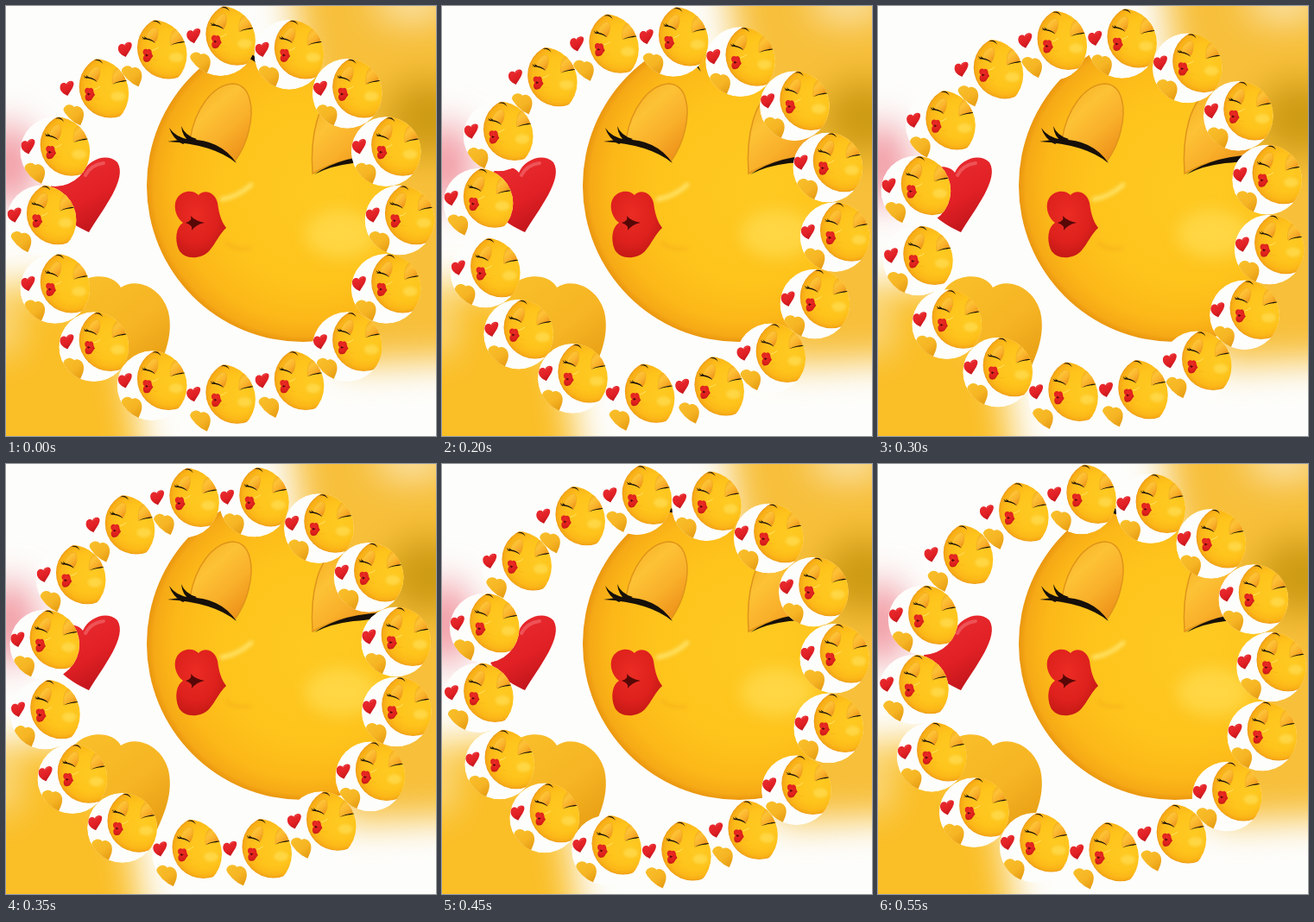
These frames come from a looping animation (498 by 498 pixels, 0.6 s). An HTML page:

```html
<!DOCTYPE html>
<html lang="en">
<head>
<meta charset="utf-8">
<title>Kiss ring</title>
<style>
  html, body { margin: 0; width: 100%; height: 100%; overflow: hidden; background: #fdfdfb; }
  svg { display: block; width: 498px; height: 498px; }
</style>
</head>
<body>
<svg viewBox="0 0 498 498">
  <defs>
    <filter id="soft" filterUnits="userSpaceOnUse" x="-120" y="-120" width="740" height="740" color-interpolation-filters="sRGB">
      <feGaussianBlur stdDeviation="21"/>
    </filter>
    <filter id="glow" x="-50%" y="-50%" width="200%" height="200%" color-interpolation-filters="sRGB">
      <feGaussianBlur stdDeviation="9"/>
    </filter>
    <filter id="sheen" x="-50%" y="-50%" width="200%" height="200%" color-interpolation-filters="sRGB">
      <feGaussianBlur stdDeviation="2"/>
    </filter>
    <clipPath id="disc"><circle cx="248.5" cy="248" r="202"/></clipPath>
    <radialGradient id="skin" gradientUnits="userSpaceOnUse" cx="344" cy="208" r="181" fx="375" fy="220">
      <stop offset="0" stop-color="#feca22"/>
      <stop offset=".6" stop-color="#fec41c"/>
      <stop offset=".85" stop-color="#fcb818"/>
      <stop offset=".96" stop-color="#f6aa16"/>
      <stop offset="1" stop-color="#ea960f"/>
    </radialGradient>
    <linearGradient id="lid" x1=".1" y1="0" x2=".8" y2="1">
      <stop offset="0" stop-color="#f5ac1e"/>
      <stop offset=".35" stop-color="#fdc236"/>
      <stop offset=".65" stop-color="#f9b02a"/>
      <stop offset="1" stop-color="#ec8f18"/>
    </linearGradient>
    <linearGradient id="hand" x1="0" y1="0" x2=".7" y2="1">
      <stop offset="0" stop-color="#f9c02a"/>
      <stop offset=".6" stop-color="#f6b524"/>
      <stop offset="1" stop-color="#e79d13"/>
    </linearGradient>
    <linearGradient id="heart" x1=".3" y1="0" x2=".8" y2="1">
      <stop offset="0" stop-color="#ea2c30"/>
      <stop offset=".55" stop-color="#e02024"/>
      <stop offset="1" stop-color="#b9131a"/>
    </linearGradient>
    <radialGradient id="lips" cx=".4" cy=".35" r=".7">
      <stop offset="0" stop-color="#ea2c24"/>
      <stop offset=".6" stop-color="#df211d"/>
      <stop offset="1" stop-color="#c01814"/>
    </radialGradient>

    <g id="scene" clip-path="url(#disc)">
      <circle cx="248.5" cy="248" r="203" fill="#fdfdfb"/>
      <path fill="url(#heart)" d="M96 262C80 254 52 241 52 212C52 186 79 180 89 193C95 178 117 169 129 181C141 200 113 234 96 262Z"/>
      <path d="M92 196Q98 184 113 182" fill="none" stroke="#f47075" stroke-width="4" stroke-linecap="round" opacity=".6"/>
      <path fill="url(#hand)" d="M133 326C125 311 100 309 84 321C60 340 70 380 110 405L168 440C176 418 196 388 188 354C180 325 150 314 133 326Z"/>
      <circle cx="344" cy="208" r="181" fill="url(#skin)"/>
      <ellipse cx="388" cy="264" rx="42" ry="28" fill="#ffe05c" opacity=".6" filter="url(#glow)"/>
      <path d="M250 224Q270 220 284 207" fill="none" stroke="#ffe368" stroke-width="5" stroke-linecap="round" filter="url(#sheen)"/>
      <path d="M254 274Q266 283 284 281" fill="none" stroke="#f0a51a" stroke-width="3" opacity=".5" filter="url(#sheen)"/>

      <path fill="url(#lid)" stroke="#e0941a" stroke-width="1.5" d="M213 155C219 118 240 91 263 90C283 91 288 118 281 145Q277 163 265 180Q244 156 213 155Z"/>
      <path fill="url(#lid)" stroke="#e0941a" stroke-width="1.5" d="M355 194C352 152 361 104 388 98C414 98 428 140 430 174Q390 174 355 194Z"/>
      <g fill="#17100a">
        <path d="M187 157Q243 146 267 182Q240 160 187 157Z"/>
        <path d="M189 141Q196 152 213 155L205 160Q193 154 189 141ZM203 139Q207 150 221 154L214 158Q204 152 203 139Z"/>
        <path d="M357 195Q390 172 446 172Q432 180 402 182Q376 185 357 195Z"/>
        <path d="M250 58Q282 38 300 76Q278 50 250 58ZM372 80Q402 56 424 86Q400 66 372 80Z"/>
      </g>

      <path fill="url(#lips)" d="M205 251C194 243 191 222 206 216C214 213 220 216 223 219C229 212 242 215 245 228C247 243 250 250 255 257C247 264 243 275 235 284C225 294 206 294 200 282C195 270 197 256 205 251Z"/>
      <path fill="#570806" d="M214 243Q219 249 230 251Q220 253 215 260Q217 254 208 251Q216 249 214 243Z"/>
    </g>
  </defs>

  <rect width="498" height="498" fill="#fdfdfb"/>
  <g filter="url(#soft)">
    <path fill="#f7bf3a" d="M318-120H620V405L390 415Z"/>
    <ellipse cx="490" cy="130" rx="52" ry="44" fill="#cd9a14"/>
    <ellipse cx="470" cy="-4" rx="45" ry="22" fill="#fbe6b4"/>
    <path fill="#fabe26" d="M-120 330L70 322L140 408L172 620H-120Z"/>
    <ellipse cx="-4" cy="370" rx="18" ry="38" fill="#fbe2a0"/>
    <ellipse cx="4" cy="184" rx="30" ry="48" fill="#f0929c"/>
  </g>
  <use href="#scene"/>
  <g id="ring"></g>
</svg>
<script>
  const COUNT = 16, RADIUS = 207.5, CX = 248.5, CY = 248, SCALE = 0.2;
  const TICK = 50, STEP = 1.35;
  // Ring turn at each tick, in steps of 1.35 degrees.
  const TURNS = [0, 1, 2, 3, 4, 6, 7, 8, 10, 12, 13, 14];
  const ring = document.getElementById('ring');

  const minis = Array.from({ length: COUNT }, () => {
    const mini = document.createElementNS('http://www.w3.org/2000/svg', 'use');
    mini.setAttribute('href', '#scene');
    return ring.appendChild(mini);
  });

  function place(turn) {
    minis.forEach((mini, i) => {
      const a = (i * 360 / COUNT + turn * STEP) * Math.PI / 180;
      const x = CX + RADIUS * Math.sin(a), y = CY - RADIUS * Math.cos(a);
      mini.setAttribute('transform',
        `translate(${x.toFixed(2)} ${y.toFixed(2)}) scale(${SCALE}) translate(${-CX} ${-CY})`);
    });
  }

  let shown = 0;
  function draw(now) {
    const turn = TURNS[Math.floor(now / TICK) % TURNS.length];
    if (turn !== shown) place(shown = turn);
    requestAnimationFrame(draw);
  }
  place(0);
  requestAnimationFrame(draw);
</script>
</body>
</html>
```
